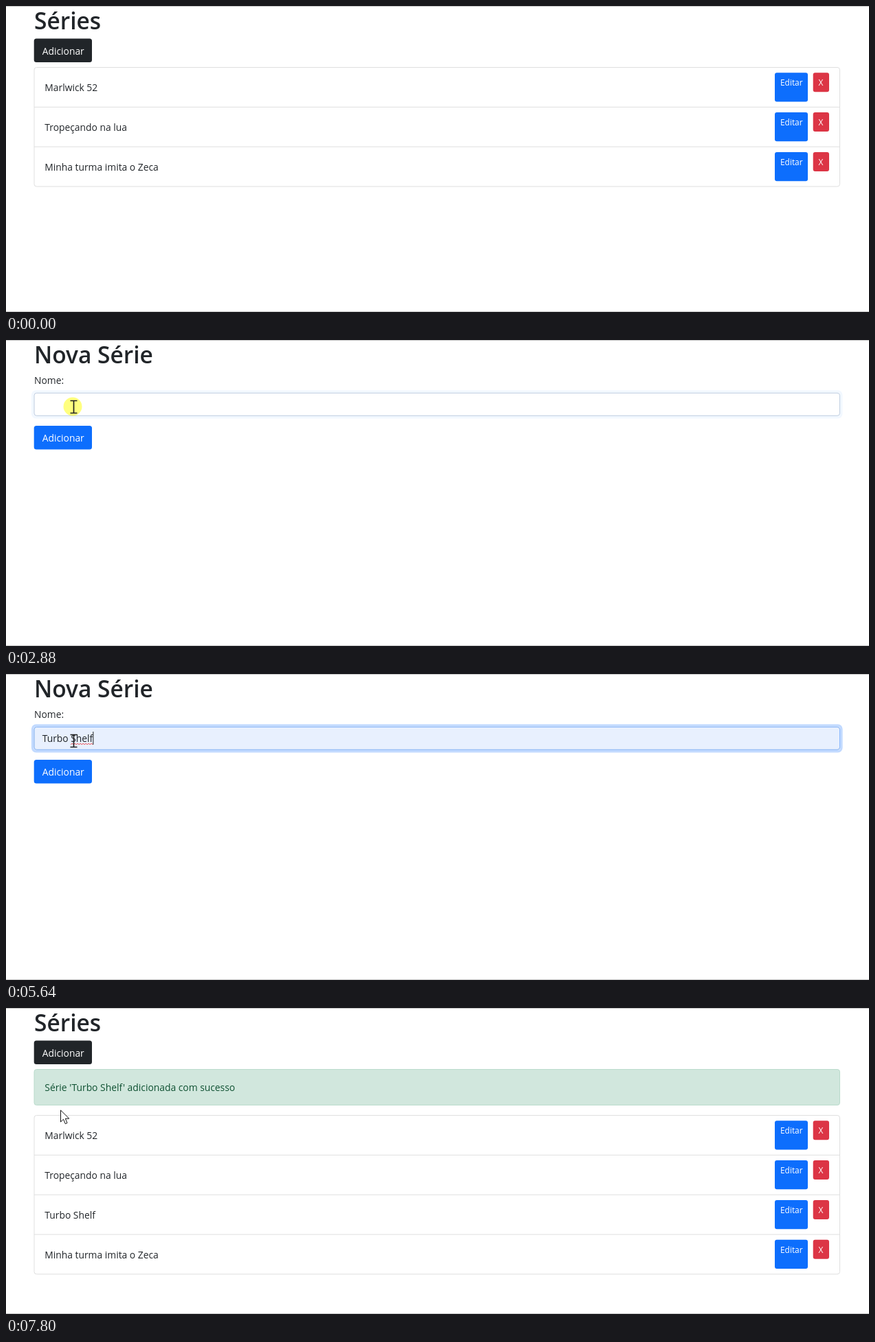
Write an HTML page that moves like this. It is 1255 px wide and 446 px high and loops after 8 s.

```html
<!DOCTYPE html>
<html lang="pt-BR">
<head>
<meta charset="utf-8">
<title>Séries</title>
<style>
  html, body { margin: 0; width: 100%; height: 100%; overflow: hidden; background: #fff; }
  svg { display: block; width: 100%; height: 100%; }
  text { font-family: "Open Sans", sans-serif; font-size: 13.85px; fill: #212529; white-space: pre; }
  .title { font-size: 33.5px; font-weight: 600; }
  .small { font-size: 11.9px; }
  .option { font-size: 14.05px; }
  .white { fill: #fff; }
  .alert { fill: #0f5132; }
  .popup { filter: drop-shadow(0 1px 1.5px rgba(0, 0, 0, .35)); }
</style>
</head>
<body>
<svg id="stage" viewBox="0 0 1255 446"></svg>
<script>
const LOOP = 8000, FORM_AT = 1730, SAVED_AT = 7800;
const NEW_SHOW = 'Turbo Shelf';
const SHOWS = ['Marlwick 52', 'Tropeçando na lua', 'Minha turma imita o Zeca'];
const HISTORY = ['a', 'teste', SHOWS[1], 'Bea', SHOWS[2], 'apagar'];

// [time, value] lists; a value holds until the next time
const TYPED = [[0, ''], [3220, 't'], [3290, 'tu'], [3890, 'tur'], [4420, 'turb'], [4620, 'turbo'], [5150, NEW_SHOW]];
const CARET = [[0, 0], [2950, 1], [3820, 0], [3890, 1], [5150, 0], [5430, 1], [5970, 0], [6510, 1], [6580, 0]];
const POINTER = [
  [180, [1035, 420]], [250, [700, 255]], [320, [360, 125]], [390, [154, 70]],
  [650, [140, 69]], [720, [104, 66]], [790, [70, 63]], [860, [57.5, 63]],
  [2340, [70, 72]], [2410, [89, 88]], [2480, [98.5, 97.5]],
  [5970, [97, 102]], [6040, [93, 117]], [6110, [86, 135]], [6180, [81, 146]], [6250, [79.5, 149]]
];
const CLICKS = [[1060, 1260], [2880, 3090], [6510, 6720]];

const CURSORS = {
  arrow: '<path d="M0 0V17L4 13.2L6.8 19.8L9.5 18.6L6.8 12.2H12.3Z" fill="#fff" stroke="#111"/>',
  hand: '<path d="M-2 13V1.5Q0-1.5 2 1.5V8Q4.5 6.5 6 9Q8.5 8 9.2 10.5Q12 10 12 13V17L9.5 23.5H-1.5L-7 14.5Q-7.5 11.5-4.5 12Z" fill="#fff" stroke="#111"/>',
  beam: '<path d="M-5-9H5M0-9V9M-5 9H5" fill="none" stroke="#222" stroke-width="1.7"/>'
};

const stage = document.getElementById('stage');
const ruler = document.createElement('canvas').getContext('2d');
ruler.font = '13.85px "Open Sans", sans-serif';
const widthOf = s => ruler.measureText(s).width;

const held = (track, t) => (track.filter(k => k[0] <= t).pop() || [])[1];
const fadeIn = (t, start) => Math.min(1, Math.max(0, (t - start) / 150));
const between = (t, a, b) => t >= a && t < b;

const text = (s, x, y, cls = '') => `<text x="${x}" y="${y}" class="${cls}">${s}</text>`;
const rect = (x, y, w, h, fill, r = 3.5, extra = '') =>
  `<rect x="${x}" y="${y}" width="${w}" height="${h}" rx="${r}" fill="${fill}" ${extra}/>`;
const ring = (x, y, w, h, color, opacity) =>
  rect(x - 1.8, y - 1.8, w + 3.6, h + 3.6, 'none', 5, `stroke="${color}" stroke-width="3.6" opacity="${opacity}"`);

function addButton(y, fill, hoverFill, ringColor, hover, focus) {
  const box = [40.7, y, 84.3, 34.6];
  return ring(...box, ringColor, focus * .5) + rect(...box, fill) +
    rect(...box, hoverFill, 3.5, `opacity="${hover}"`) + text('Adicionar', 52.7, y + 23, 'white');
}

function showList(names, top) {
  const pitch = 57.85;
  let out = rect(41, top, 1171.5, pitch * names.length, '#fff', 3.5, 'stroke="#dfdfdf"');
  names.forEach((name, i) => {
    const y = top + i * pitch;
    if (i) out += `<path d="M41 ${y}H1212.5" stroke="#dfdfdf"/>`;
    out += text(name, 56.3, y + 34.7) +
      rect(1118, y + 7.7, 48, 42.3, '#0d6efd', 3) + text('Editar', 1126, y + 26.5, 'small white') +
      rect(1173.7, y + 7.7, 23.3, 28, '#dc3545', 3) + text('X', 1181.6, y + 26.5, 'small white');
  });
  return out;
}

function listPage(t) {
  const saved = t >= SAVED_AT;
  const hover = saved ? 0 : fadeIn(t, 680), focus = saved ? 0 : fadeIn(t, 1030);
  let out = text('Séries', 41, 33.5, 'title') + addButton(47.5, '#212529', '#1c1f23', '#424649', hover, focus);
  if (!saved) return out + showList(SHOWS, 89.5);
  out += rect(41, 89.5, 1171.5, 52, '#d1e7dd', 3.5, 'stroke="#badbcc"') +
    text(`Série '${NEW_SHOW}' adicionada com sucesso`, 56.3, 121.3, 'alert');
  return out + showList([SHOWS[0], SHOWS[1], NEW_SHOW, SHOWS[2]], 156.5);
}

function popup(t) {
  if (!between(t, 2950, 5570)) return '';
  const options = t < 3220 ? HISTORY : t < 3290 ? [NEW_SHOW, 'teste'] : [NEW_SHOW];
  const width = options === HISTORY ? 219 : 123.5;
  const opacity = 1 - fadeIn(t, 5410);
  const height = 10 + 40.75 * options.length;
  let out = `<g opacity="${opacity}"><g class="popup">` + rect(152.7, 120.8, width, height, '#fff', 4) +
    '<path d="M169 121L178.5 112L188 121Z" fill="#fff"/></g>';
  if (t >= 5150) out += rect(152.7, 125.5, width, 40.5, '#e8e8e9', 0);
  options.forEach((s, i) => out += text(s, 166.6, 151.2 + i * 40.75, 'option'));
  return out + '</g>';
}

function squiggle(from, to) {
  let d = `M${from} 103`;
  for (let x = from + 2, up = true; x <= to; x += 2, up = !up) d += `L${x} ${up ? 101 : 103}`;
  return `<path d="${d}" fill="none" stroke="#e33" stroke-width=".9"/>`;
}

function formPage(t) {
  const focus = fadeIn(t, 2850) - fadeIn(t, 6520);
  const typed = held(TYPED, t), left = 52.7, end = left + widthOf(typed);
  const field = [41, 77.3, 1171.5, 33];
  let out = text('Nova Série', 41, 33.5, 'title') + text('Nome:', 41, 64) +
    ring(40.5, 76.8, 1172.5, 34, '#0d6efd', focus * .25) +
    rect(...field, t < 5150 ? '#fff' : '#e8f0fe', 3.5, 'stroke="#ced4da"') +
    rect(...field, 'none', 3.5, `stroke="#86b7fe" opacity="${focus}"`) + text(typed, left, 99.3);
  if (between(t, 5640, 6580)) out += squiggle(left + widthOf('Turbo '), end);
  if (held(CARET, t)) out += rect(end, 84, 1, 19, '#222', 0);
  return out + addButton(125, '#0d6efd', '#0b5ed7', '#3184fd', fadeIn(t, 6080), fadeIn(t, 6480)) + popup(t);
}

function cursorKind(t, y) {
  if (between(t, 720, 1530) || between(t, 6110, 7510)) return 'hand';
  return between(t, 2340, 6110) && between(y, 77, 111) ? 'beam' : 'arrow';
}

function pointer(t) {
  const at = held(POINTER, t);
  if (!at) return '';
  const [x, y] = at;
  const pressed = CLICKS.some(([a, b]) => between(t, a, b));
  return `<g transform="translate(${x} ${y})">` +
    (pressed ? '<circle cx="-1.5" cy="-.5" r="13.5" fill="#ff0" opacity=".5"/>' : '') +
    CURSORS[cursorKind(t, y)] + '</g>';
}

let shown = '';
function draw(now) {
  const t = now % LOOP;
  const page = between(t, FORM_AT, SAVED_AT) ? formPage(t) : listPage(t);
  const picture = rect(0, 0, 1255, 446, '#fff', 0) + page +
    '<path d="M0 .5H1255M0 445.5H1255" stroke="#c4c4c4"/>' + pointer(t);
  if (picture !== shown) stage.innerHTML = shown = picture;
}

const start = performance.now();
function tick() {
  draw(performance.now() - start);
  requestAnimationFrame(tick);
}
tick();
</script>
</body>
</html>
```
